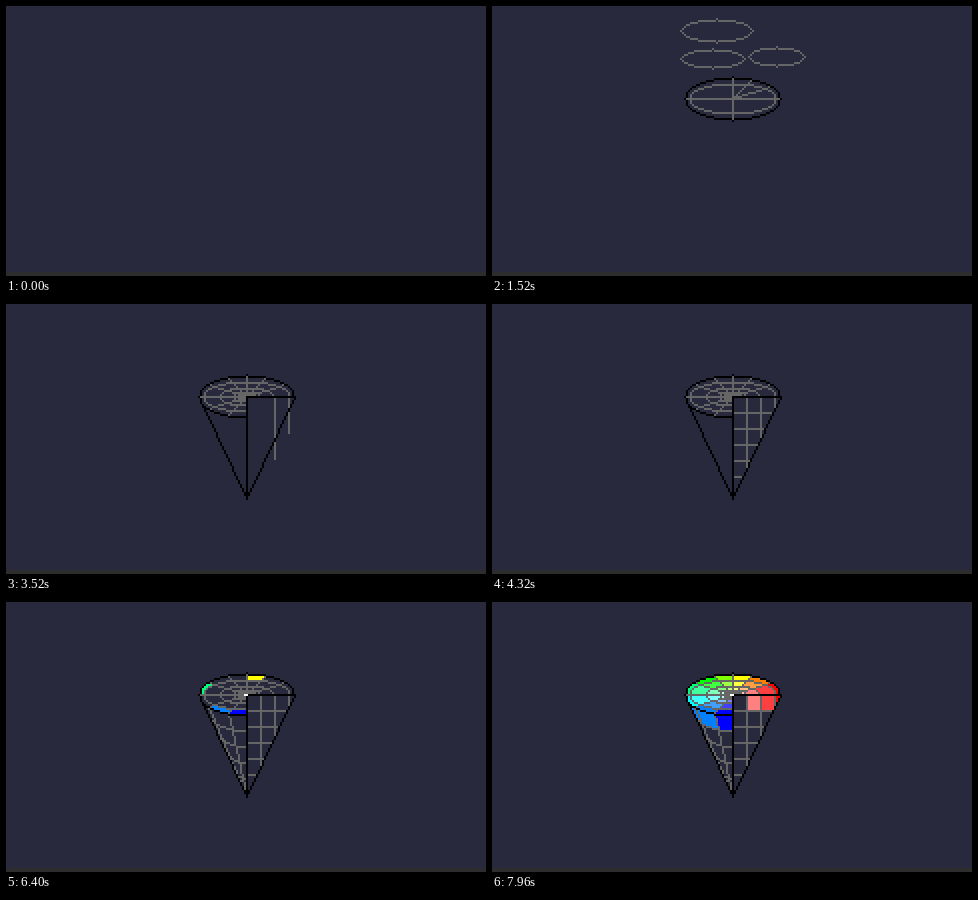
Recreate the animation shown at these times as an HTML page with a canvas. Size 480x270 px, loop 8 s.

```html
<!DOCTYPE html>
<html lang="en">
<head>
<meta charset="utf-8">
<title>Colour cone</title>
<style>
html, body { margin: 0; width: 100%; height: 100%; overflow: hidden; background: #29293d; }
canvas { display: block; width: 480px; height: 270px; image-rendering: pixelated; }
</style>
</head>
<body>
<canvas id="stage" width="240" height="135"></canvas>
<script>
const ctx = document.getElementById('stage').getContext('2d');
const LOOP = 8000, STEP = 40;
const BG = '#29293d', STRIP = '#2d2d2d', GREY = '#666', BLACK = '#000', WHITE = '#fff';
const CX = 120, CY = 46, RX = 24, RY = 11, APEX = 97;
const RINGS = [[22, 8], [14, 5], [7, 3]];
const SPOKES = [[9, -9], [19, -6], [-9, -9], [-19, -6], [-19, 6], [-9, 9], [9, 9], [19, 6]];
const all = () => true;

const clamp = v => Math.max(0, Math.min(1, v));
const part = (t, a, b) => clamp((t - a + STEP) / (b - a + STEP));
const inside = (dx, dy, rx, ry) => (dx / rx) ** 2 + (dy / ry) ** 2 <= 1;

function dot(x, y, color) {
  ctx.fillStyle = color;
  ctx.fillRect(x, y, 1, 1);
}

function line(x0, y0, x1, y1, color, p = 1, keep = all) {
  if (p <= 0) return;
  const n = Math.max(Math.abs(x1 - x0), Math.abs(y1 - y0), 1);
  for (let i = 0; i <= n * p; i++) {
    const x = Math.round(x0 + (x1 - x0) * i / n);
    const y = Math.round(y0 + (y1 - y0) * i / n);
    if (keep(x, y)) dot(x, y, color);
  }
}

// Outline: every pixel of the disc that has a side neighbour outside it.
function ellipse(cx, cy, rx, ry, color, keep = all) {
  for (let y = -ry; y <= ry; y++) for (let x = -rx; x <= rx; x++) {
    const edge = !inside(Math.abs(x) + 1, y, rx, ry) || !inside(x, Math.abs(y) + 1, rx, ry);
    if (edge && inside(x, y, rx, ry) && keep(cx + x, cy + y)) dot(cx + x, cy + y, color);
  }
}

const halfWidth = y => RX * (APEX - y) / (APEX - CY);
const rightEdge = y => CX + halfWidth(y);
const leftEdge = y => CX - halfWidth(y);
const hue = (sector, sat) => `hsl(${sector * 30} 100% ${100 - 50 * sat}%)`;

function arcY(x, k) {
  const rx = halfWidth(CY + 8 * k);
  return CY + 8 * k + 10 * Math.sqrt(Math.max(0, 1 - ((x - CX) / rx) ** 2));
}

// Order in which the cells get their colour.
const order = [7, 8, 5, 2, 0, 1, 3, 4, 6].map(s => [s, 0]);
for (let ring = 1; ring < 4; ring++)
  for (let s = 0; s < 9; s++) order.push([s, ring]);
const fillTime = (sector, ring) => {
  const i = order.findIndex(c => c[0] === sector && c[1] === ring);
  return i < 4 ? 6160 + i * STEP : 6440 + (i - 4) * STEP;
};

function fillWheel(t) {
  for (let y = -RY; y <= RY; y++) for (let x = -RX; x <= RX; x++) {
    if ((x > 0 && y > 0) || !inside(x, y, RX, RY)) continue;
    const angle = (Math.atan2(-y * 1.75, x) * 180 / Math.PI + 360) % 360;
    const sector = Math.min(8, Math.floor(angle / 30));
    const ring = RINGS.filter(r => inside(x, y, r[0], r[1])).length;
    if (t >= fillTime(sector, ring)) dot(CX + x, CY + y, hue(sector, 1 - ring / 4));
  }
}

function fillSides(t) {
  for (let x = 98; x < CX; x++) for (let y = 50; y < 64; y++) {
    if (x < leftEdge(y) || y >= arcY(x, 1) || inside(x - CX, y - CY, RX, RY)) continue;
    const blue = x >= 111 + 9 * (y - 55) / (APEX - 55);
    if (t >= (blue ? 7760 : 7720)) dot(x, y, hue(blue ? 8 : 7, 1));
  }
  for (let y = CY + 1; y < 54; y++) for (let x = 128; x < rightEdge(y); x++) {
    const col = Math.floor((x - CX) / 7);
    if (t >= 7960 - col * STEP) dot(x, y, hue(0, (col + 1) / 4));
  }
}

function drawCross(t) {
  line(CX, CY - RY + 1, CX, CY + RY - 1, GREY, part(t, 640, 760), (x, y) => t < 3280 || y <= CY);
  line(CX - RX + 1, CY, CX + RX - 1, CY, GREY, part(t, 600, 720));
}

// A large circle that is flattened into the rim of the cone.
function drawRim(t) {
  const p = part(t, 280, 560);
  const mix = (a, b) => Math.round(a + (b - a) * p);
  const keep = (x, y) => t < 3280 || x <= CX || y <= CY;
  ellipse(CX, mix(64, CY), mix(46, RX), mix(46, RY), BLACK, keep);
}

function drawWheel(t) {
  const keep = (x, y) => t < 2720 || x <= CX || y <= CY;
  const ringTimes = [1360, 2040, 2280];
  RINGS.forEach(([rx, ry], i) => {
    if (t >= ringTimes[i]) ellipse(CX, CY, rx, ry, GREY, keep);
  });
  SPOKES.forEach(([dx, dy], i) => {
    if (t >= 1480 + i * STEP) line(CX, CY, CX + dx, CY + dy, GREY, 1, keep);
  });
  if (t >= 1160 && t < 1760) ellipse(112, 12, 18, 6, GREY);
  if (t >= 1240 && t < 1800) ellipse(110, 26, 16, 5, GREY);
  if (t >= 1440 && t < 1840) ellipse(142, 25, 14, 5, GREY);
}

function drawPanel(t) {
  const keep = (x, y) => t < 4320 || x < rightEdge(y);
  [[134, 77, 3400], [141, 64, 3520], [127, 90, 3640]].forEach(([x, end, at]) => {
    line(x, CY + 1, x, end, GREY, part(t, at - STEP, at), keep);
  });
  for (let k = 1; k < 6; k++) {
    const y = CY + 8 * k;
    line(CX + 1, y, Math.floor(rightEdge(y)), y, GREY, part(t, 3800 + k * 80, 3840 + k * 80));
  }
}

function drawFace(t) {
  for (let k = 1; k < 6; k++) {
    const p = part(t, 4960 + (k - 1) * 100, 5120 + (k - 1) * 100);
    if (p <= 0) continue;
    const from = CX - Math.round(20 * p);
    for (let x = CX - 1; x >= from; x--) {
      const y = Math.round(arcY(x, k));
      if (x < leftEdge(y)) break;
      dot(x, y, GREY);
    }
  }
  line(111, 55, CX, APEX, GREY, part(t, 5640, 5800));
  line(101, 52, CX, APEX, GREY, part(t, 5840, 6000));
}

function drawEdges(t) {
  line(CX, CY, CX, APEX, BLACK, part(t, 2960, 3040));
  line(98, 50, CX, APEX, BLACK, part(t, 3080, 3160));
  line(CX + RX, CY, CX, APEX, BLACK, part(t, 3200, 3280));
  line(CX, CY, CX + RX, CY, BLACK, part(t, 3320, 3360));
}

function drawRuler(t) {
  if (t < 4680 || t >= 5520) return;
  const shown = part(t, 4680, 5000) * 47;
  for (let i = 0; i < shown; i++)
    if (i % 8 !== 7) dot(85, 36 + i, WHITE);
}

function draw(t) {
  ctx.fillStyle = BG;
  ctx.fillRect(0, 0, 240, 135);
  ctx.fillStyle = STRIP;
  ctx.fillRect(0, 133, 240, 2);
  if (t < 40) return;

  if (t >= 6160) {
    fillWheel(t);
    fillSides(t);
  }
  drawCross(t);
  drawWheel(t);
  drawPanel(t);
  drawFace(t);
  drawRim(t);
  drawEdges(t);
  drawRuler(t);
  if (t >= 6120) line(CX - 1, CY, CX, CY, WHITE);
}

const start = performance.now();
function tick(now) {
  const t = Math.max(0, now - start) % LOOP;
  draw(Math.floor(t / STEP) * STEP);
  requestAnimationFrame(tick);
}
draw(0);
requestAnimationFrame(tick);
</script>
</body>
</html>
```
